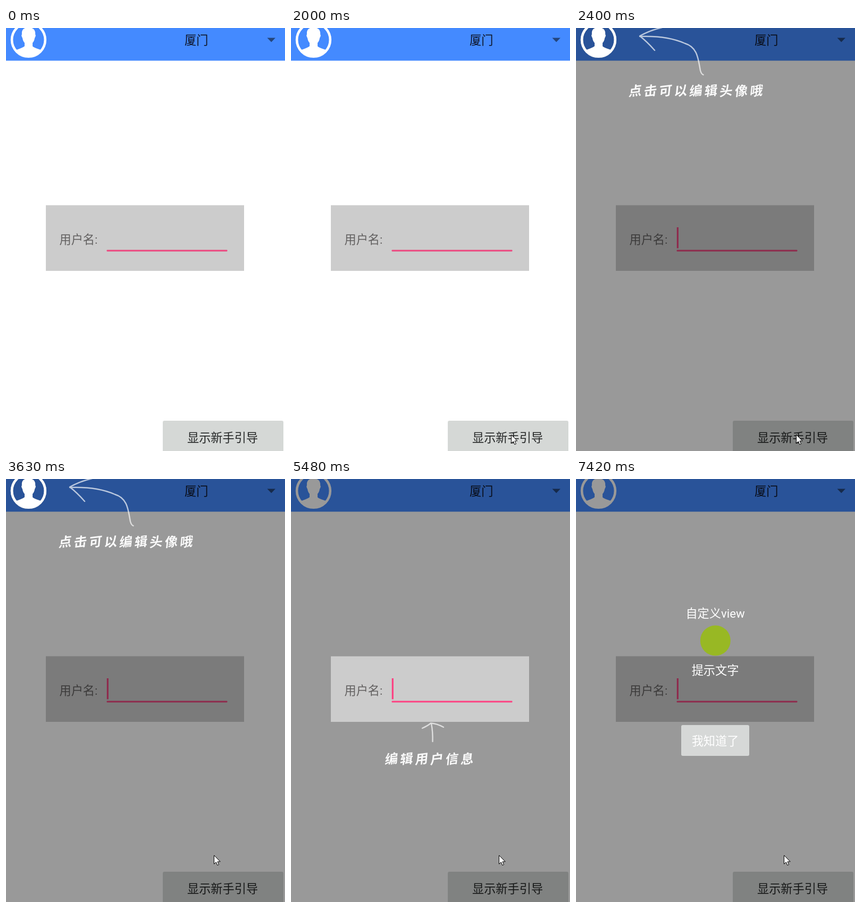
An HTML page with a canvas for the animation above (8000 ms loop, 525 px wide and 796 px high).

```html
<!DOCTYPE html>
<html lang="zh-CN">
<head>
<meta charset="utf-8">
<title>新手引导</title>
<style>
html, body { margin: 0; width: 100%; height: 100%; overflow: hidden; background: #fff; }
canvas { display: block; width: 525px; height: 796px; }
</style>
</head>
<body>
<canvas id="stage" width="525" height="796"></canvas>
<script>
const ctx = document.getElementById('stage').getContext('2d');
const W = 525, H = 796, LOOP = 8000;
const CJK = '"Noto Sans CJK SC", "Noto Sans CJK", sans-serif';
const PLAIN = '22.2px Roboto, ' + CJK;
const MEDIUM = '500 ' + PLAIN;
const BRUSH = '700 24.5px ' + CJK;
const BRUSH_PITCH = 28.5;

function rect(x, y, w, h, color, r = 0) {
  ctx.fillStyle = color;
  ctx.beginPath();
  ctx.roundRect(x, y, w, h, r);
  ctx.fill();
}

function disc(x, y, r, color) {
  ctx.fillStyle = color;
  ctx.beginPath();
  ctx.arc(x, y, r, 0, Math.PI * 2);
  ctx.fill();
}

function text(str, x, y, color, align = 'left', font = PLAIN) {
  ctx.font = font;
  ctx.textAlign = align;
  ctx.fillStyle = color;
  ctx.fillText(str, x, y);
}

// handwriting: every character leans and rises to the right
function brush(str, x, y) {
  [...str].forEach((char, i) => {
    ctx.save();
    ctx.transform(1, -.12, -.1, 1, x + (i + .5) * BRUSH_PITCH, y);
    text(char, 0, 9, 'rgba(255,255,255,.95)', 'center', BRUSH);
    ctx.restore();
  });
}

function stroke(path) {
  ctx.strokeStyle = 'rgba(255,255,255,.68)';
  ctx.lineWidth = 2.4;
  ctx.lineCap = ctx.lineJoin = 'round';
  ctx.stroke(new Path2D(path));
}

function avatar(color) {
  ctx.save();
  ctx.strokeStyle = color;
  ctx.lineWidth = 4.6;
  ctx.beginPath();
  ctx.arc(42.4, 22.3, 31.4, 0, Math.PI * 2);
  ctx.stroke();
  ctx.clip();
  ctx.fillStyle = color;
  ctx.fill(new Path2D('M42.3-1C33-1 29 4 30 12Q28 14 31 19Q32 25 35 28V34' +
    'Q34 36 20 41Q15 43 12 56H72Q69 43 65 41Q50 36 50 34V28' +
    'Q53 25 54 19Q57 14 55 12C56 4 51-1 42.3-1Z'));
  ctx.restore();
}

function spinner(label, arrow) {
  text('厦门', 336, 30.5, label, 'left', MEDIUM);
  ctx.fillStyle = arrow;
  ctx.fill(new Path2D('M491.5 18.5H507L499.3 26.5Z'));
}

function form(caret, pink) {
  rect(75, 333.5, 373, 123.5, '#cccccc');
  text('用户名:', 100.5, 406, '#626060');
  rect(189.5, 417.5, 227, 3, pink, 1);
  if (caret) rect(189.7, 375, 3.2, 39.5, pink);
}

function page(caret, pressed) {
  rect(0, 0, W, H, '#ffffff');
  rect(0, 0, W, 61.4, '#448aff');
  avatar('#ffffff');
  spinner('#0e1322', '#24457c');
  form(caret, '#ee467f');
  rect(295, 739, 227, 64, pressed ? '#c6c8c7' : '#d5d8d6', 3);
  text('显示新手引导', 341, 778.5, '#222424', 'left', MEDIUM);
}

function avatarTip() {
  avatar('#ffffff');
  stroke('M162-1Q140 4 120 15Q134 26 148 42M120 16C148 15 180 18 205 29' +
    'C229 36 230 59 234 80Q236 87 239.5 88');
  brush('点击可以编辑头像哦', 97.5, 118);
}

function cityTip() {
  spinner('#000000', '#0b1526');
  stroke('M456.5 143Q455.5 110 457 76M449.5 95Q451 77 457 73Q462 75 466.5 88');
  brush('选择您所在的城市', 277.5, 169.5);
}

function formTip() {
  form(true, '#ff4081');
  stroke('M266.5 494Q267 475 264 460M247 469Q258 464 263 459.5Q274 460 287 467');
  brush('编辑用户信息', 175, 526.5);
}

function customTip() {
  text('自定义view', 262, 260.5, '#fff', 'center');
  disc(262.3, 304, 28.5, '#98b824');
  text('提示文字', 262, 368, '#fff', 'center');
  rect(198, 463, 128, 58, '#d6d8d7', 3);
  text('我知道了', 262, 500.5, '#fff', 'center');
}

function pointer(x, y) {
  ctx.save();
  ctx.translate(x + .5, y + .5);
  const shape = new Path2D('M0 0V16L3.8 12.5L6.3 18.3L9 17.2L6.5 11.5H11.3Z');
  ctx.fillStyle = '#fff';
  ctx.fill(shape);
  ctx.strokeStyle = '#000';
  ctx.lineWidth = 1;
  ctx.lineJoin = 'miter';
  ctx.stroke(shape);
  ctx.restore();
}

function movePointer(t) {
  if (t < 670) return;
  if (t >= 3630) return pointer(391, 708);
  // enters from the bottom edge in four short hops
  const left = 1 - Math.min(3, Math.floor((t - 670) / 80)) / 3;
  pointer(Math.round(414 + 12 * left), Math.round(765 + 25 * left * left));
}

const between = (t, a, b) => t >= a && t < b;

function draw(t) {
  const guided = t >= 2400;
  const caret = guided || between(t, 440, 990) || between(t, 1520, 2000);
  page(caret, between(t, 2170, 2310));
  if (guided) {
    rect(0, 0, W, H, 'rgba(0,0,0,.4)');
    const all = between(t, 6260, 7420);
    if (t < 4320 || all) avatarTip();
    if (between(t, 4320, 5480) || all) cityTip();
    if (between(t, 5480, 7420)) formTip();
    if (t >= 7420) customTip();
  }
  movePointer(t);
}

const start = performance.now();
function tick() {
  draw((performance.now() - start) % LOOP);
  requestAnimationFrame(tick);
}
tick();
</script>
</body>
</html>
```
